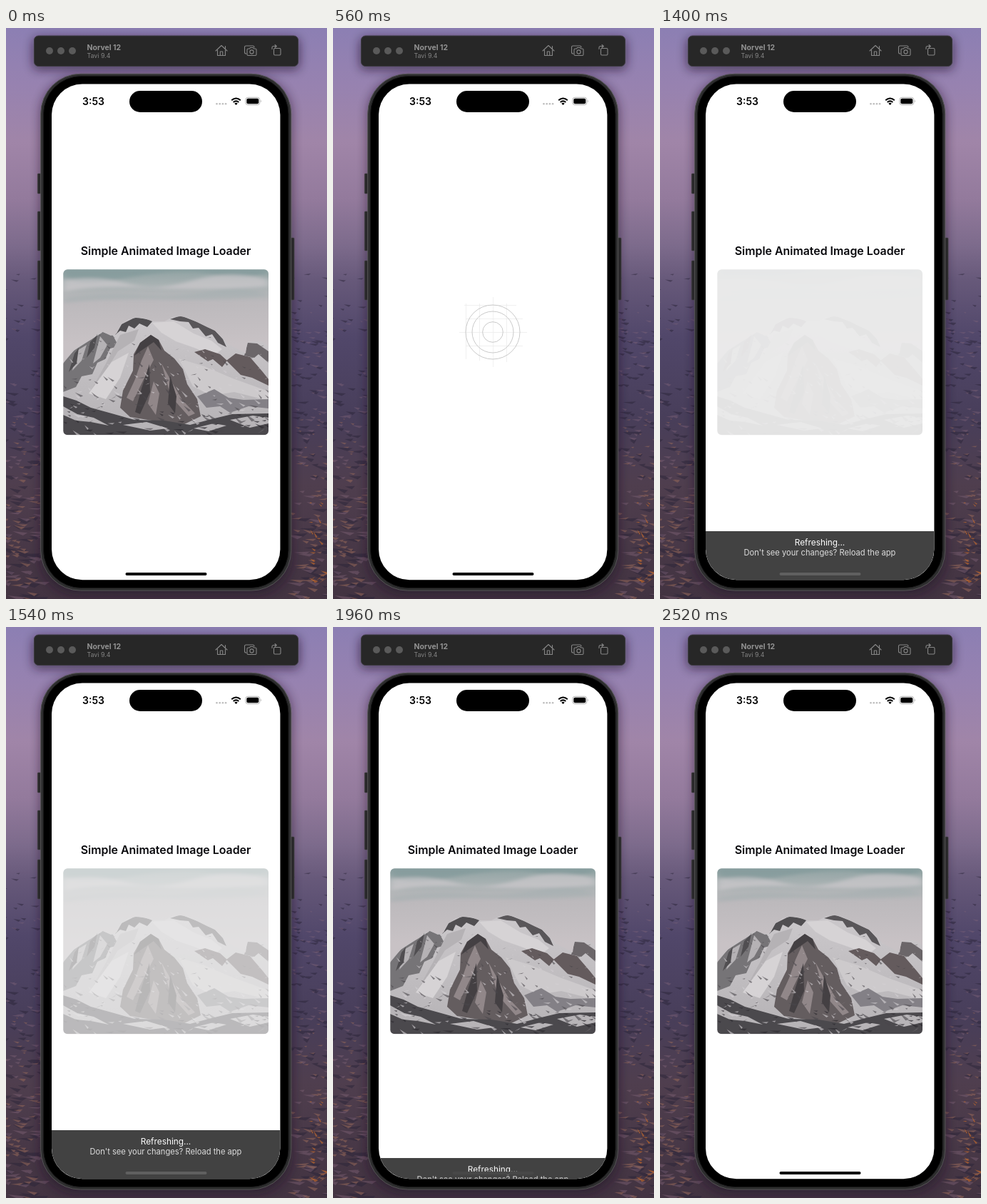
Write an HTML page that moves like this. It is 450 by 800 pixels and loops after 2.59 s.

```html
<!DOCTYPE html>
<html lang="en">
<head>
<meta charset="utf-8">
<title>Image loader</title>
<style>
  html, body { margin: 0; width: 100%; height: 100%; overflow: hidden; background: #4a4060; }
  svg { display: block; width: 450px; height: 800px; font-family: Inter, "Open Sans", sans-serif; }
  .app, .splash, .photo, .panel, .bar, .shine { animation: 2590ms linear infinite; }
  .app { animation-name: app; animation-timing-function: step-end; }
  .splash { animation-name: splash; animation-timing-function: step-end; }
  .photo { animation-name: photo; }
  .panel { animation-name: panel; }
  .bar { animation-name: bar; }
  .shine { animation-name: shine; }
  @keyframes app { 0% { opacity: 1 } 10.811% { opacity: 0 } 27.027%, 100% { opacity: 1 } }
  @keyframes splash { 0% { opacity: 0 } 10.811% { opacity: 1 } 27.027%, 100% { opacity: 0 } }
  @keyframes photo {
    0% { opacity: 1; animation-timing-function: step-end }
    10.811% { opacity: 0; animation-timing-function: step-end }
    50.579% { opacity: 0; animation-timing-function: cubic-bezier(.455, .03, .515, .955) }
    73.745%, 100% { opacity: 1 }
  }
  @keyframes panel {
    0% { transform: translateY(69px); animation-timing-function: step-end }
    27.027% { transform: none }
    70.502% { transform: none; animation-timing-function: ease-in-out }
    80.154%, 100% { transform: translateY(69px) }
  }
  @keyframes bar {
    0% { fill: #000; animation-timing-function: step-end }
    27.027%, 70.502% { fill: #606060 }
    75.7% { fill: #484848 }
    83%, 100% { fill: #000 }
  }
  @keyframes shine {
    0%, 27.027% { transform: translateX(-70px) }
    51.351%, 100% { transform: translateX(330px) }
  }
</style>
</head>
<body>
<svg viewBox="0 0 450 800">
  <defs>
    <linearGradient id="dusk" x2="0" y2="1">
      <stop offset="0" stop-color="#8c7fb3"/>
      <stop offset=".1" stop-color="#9782b0"/>
      <stop offset=".2" stop-color="#a085a8"/>
      <stop offset=".3" stop-color="#937a9c"/>
      <stop offset=".38" stop-color="#7d6b8c"/>
      <stop offset=".44" stop-color="#67597a"/>
      <stop offset=".54" stop-color="#51476a"/>
      <stop offset=".68" stop-color="#483e5a"/>
      <stop offset=".8" stop-color="#4f3e4e"/>
      <stop offset="1" stop-color="#423341"/>
    </linearGradient>
    <linearGradient id="sky" x2="0" y2="1">
      <stop offset="0" stop-color="#8fa2a2"/>
      <stop offset=".09" stop-color="#a8b1b2"/>
      <stop offset=".2" stop-color="#bcb9bc"/>
      <stop offset=".45" stop-color="#c8c2c5"/>
    </linearGradient>
    <linearGradient id="snow" x2="0" y2="1">
      <stop offset="0" stop-color="#cbc8cb"/>
      <stop offset="1" stop-color="#b5b2b5"/>
    </linearGradient>
    <linearGradient id="band">
      <stop offset="0" stop-color="#fff" stop-opacity="0"/>
      <stop offset=".5" stop-color="#fff" stop-opacity=".4"/>
      <stop offset="1" stop-color="#fff" stop-opacity="0"/>
    </linearGradient>
    <filter id="soft" x="-20%" y="-30%" width="140%" height="160%"><feGaussianBlur stdDeviation="7"/></filter>
    <filter id="mist" x="-20%" y="-100%" width="140%" height="300%"><feGaussianBlur stdDeviation="6 2"/></filter>
    <clipPath id="screen"><rect x="64" y="78.600" width="320.400" height="694.600" rx="43"/></clipPath>
    <clipPath id="card"><rect x="80.300" y="338.300" width="287.700" height="232" rx="6"/></clipPath>
    <path id="ridge" d="M80 470 84 463 95 452 105 444 120 436 128 429 136 426 147 431 155 428 162 415 172 408 182 406 195 407 205 411 222 411 234 405 245 404 255 406 268 412 282 419 293 424 303 434 312 443 325 450 336 456 338 441 350 438 360 440 368 446V570H80Z"/>
    <clipPath id="slope"><use href="#ridge"/></clipPath>
  </defs>

  <!-- Desktop -->
  <rect width="450" height="800" fill="url(#dusk)"/>
  <g id="city"></g>

  <!-- Toolbar -->
  <rect x="37" y="13" width="375" height="46" rx="9" fill="#1a1024" opacity=".55" filter="url(#soft)"/>
  <rect x="39.500" y="11" width="370" height="42.500" rx="6" fill="#272727" stroke="#3b3940"/>
  <g fill="#5a5a5a"><circle cx="61" cy="32" r="5"/><circle cx="77" cy="32" r="5"/><circle cx="93" cy="32" r="5"/></g>
  <text x="113.500" y="31" font-size="10.500" font-weight="700" fill="#929292">Norvel 12</text>
  <text x="113.500" y="42" font-size="8.800" fill="#858585">Tavi 9.4</text>
  <g fill="none" stroke="#868686" stroke-width="1.100" stroke-linejoin="round" stroke-linecap="round">
    <path d="M294 32 302 24.500 310 32M296.500 31V38.500H307.500V31M300.300 38V33H303.700V38M307.500 29V25.500"/>
    <path d="M337 36H336.500Q334.500 36 334.500 34V27Q334.500 25 336.500 25H346Q348 25 348 27"/>
    <path d="M339.500 29H341.500L342.500 27.500H346.500L347.500 29H349.500Q351 29 351 30.500V37Q351 38.500 349.500 38.500H339.500Q338 38.500 338 37V30.500Q338 29 339.500 29Z"/>
    <circle cx="344.500" cy="33.500" r="2.600"/>
    <rect x="375.500" y="28.500" width="9.500" height="9.500" rx="1.500"/>
    <path d="M373 29.500V27.500Q373 25.500 375 25.500H379M377 23.500 379.300 25.500 377 27.500"/>
  </g>

  <!-- Phone -->
  <rect x="47" y="67" width="355" height="728" rx="54" fill="#1a1024" opacity=".45" filter="url(#soft)"/>
  <g fill="#29282a" stroke="#454346" stroke-width=".600">
    <rect x="44.300" y="204" width="5" height="28" rx="1"/>
    <rect x="44.300" y="257" width="5" height="55" rx="1"/>
    <rect x="44.300" y="326" width="5" height="55" rx="1"/>
    <rect x="399" y="294" width="5" height="87" rx="1"/>
  </g>
  <rect x="48.700" y="64.200" width="351" height="724" rx="56" fill="#2d2d2e" stroke="#555456"/>
  <rect x="52.500" y="67.500" width="343.500" height="717" rx="53" fill="#000" stroke="#171717"/>

  <g clip-path="url(#screen)">
    <rect x="60" y="75" width="330" height="702" fill="#fff"/>

    <g class="splash" fill="none">
      <path stroke="#ededed" stroke-width=".800" d="M177 426.500H272M224.500 377V475M184 388.500H257M186.500 386V464M186 407.500H266M186 445.500H266M205.500 386V466M243.500 386V468"/>
      <g stroke="#c9c9c9"><circle cx="224" cy="426" r="14.300"/><circle cx="224" cy="426" r="29"/><circle cx="224" cy="426" r="38"/></g>
    </g>

    <g class="app">
      <text x="224" y="318" font-size="15.900" font-weight="600" text-anchor="middle" fill="#08080c">Simple Animated Image Loader</text>
      <g clip-path="url(#card)">
        <rect x="80" y="338" width="289" height="233" fill="#ececec"/>
        <rect class="shine" x="60" y="338" width="80" height="233" fill="url(#band)"/>
        <g class="photo">
          <rect x="80" y="338" width="289" height="233" fill="url(#sky)"/>
          <g filter="url(#mist)">
            <path fill="#7f9798" opacity=".6" d="M80 338H368V342Q330 355 290 345T170 350T80 345Z"/>
            <path fill="#d3ced0" opacity=".6" d="M80 353Q130 346 170 358T260 354T368 352V362Q280 368 200 364T80 370Z"/>
            <path fill="#a3adb0" opacity=".45" d="M80 378Q140 370 190 374T290 368T368 376Q300 382 220 380T80 386Z"/>
          </g>
          <use href="#ridge" fill="url(#snow)"/>
          <g clip-path="url(#slope)">
            <path fill="#767477" d="M80 470 95 452 120 436 136 426 150 431 158 446 146 449 139 464 128 469 121 485 106 488 98 503 80 510Z"/>
            <path fill="#b5b2b5" d="M98 453 113 444 106 466 93 480ZM132 432 142 444 132 462 122 470ZM160 430 186 422 180 438 157 453 137 485 119 508 140 470Z"/>
            <path fill="#504e51" d="M153 430 162 415 182 405 206 410 198 419 187 414 180 421 172 417 168 426 160 424ZM118 440 128 430 124 448 113 462ZM96 456 102 448 99 470 88 482Z"/>
            <path fill="#595659" d="M230 408 245 403 268 412 293 424 304 436 309 447 297 441 289 429 280 432 270 420 262 421 256 412 244 411Z"/>
            <path fill="#d6d3d5" d="M205 413 235 411 263 428 288 438 303 450 291 459 264 448 238 439 218 427ZM148 468 172 455 160 490 140 520 116 512Z"/>
            <path fill="#645d5f" d="M203 430 188 441 179 457 178 480 164 508 160 532 174 545 211 551 246 557 273 544 268 520 254 499 248 478 236 463 222 452 214 437Z"/>
            <path fill="#918789" d="M199 446 190 466 181 492 169 518 178 523 193 492 207 465ZM218 470 233 497 247 521 265 540 256 544 231 516ZM207 495 199 526 210 542 215 512Z"/>
            <path fill="#444043" d="M203 430 188 441 180 459 191 451 207 440 218 452 214 437ZM201 471 190 505 181 538 188 541 202 510ZM230 487 227 526 237 540 239 516Z"/>
            <path fill="#645b5d" d="M264 454 279 450 300 457 310 466 303 475 290 464 283 467ZM309 466 322 456 342 461 360 482 368 492V501L345 490 329 486Z"/>
            <path fill="#6b6669" d="M334 459 339 441 352 442 368 453V469L354 457 348 462Z"/>
            <path fill="#cdcacc" d="M242 463 278 474 318 491 368 509V522L320 510 288 515 262 502Z"/>
            <path fill="#838086" d="M268 516 292 506 312 518 333 521 368 520V533L340 530 314 539 300 530 281 532Z"/>
            <path fill="#4b494d" d="M80 516 99 522 119 532 148 540 180 549 222 550 258 556 288 548 317 541 368 540V570H80Z"/>
            <path fill="#b7b4b7" d="M80 530 100 541 123 546 144 557 119 552 98 550 80 542ZM164 556 197 552 227 561 202 564ZM314 549 346 543 368 546V554L342 560ZM263 561 291 554 309 557 284 565Z"/>
            <g id="rocks"></g>
          </g>
        </g>
      </g>
      <g class="panel">
        <rect x="60" y="705" width="330" height="70" fill="#424242"/>
        <g text-anchor="middle">
          <text x="224" y="725" font-size="11.850" fill="#fff">Refreshing...</text>
          <text x="224" y="739" font-size="11.150" fill="#dedede">Don't see your changes? Reload the app</text>
        </g>
      </g>
    </g>

    <!-- Status bar -->
    <text x="122.500" y="107.500" font-size="14" font-weight="600" text-anchor="middle" fill="#000">3:53</text>
    <rect x="173" y="88" width="102" height="30" rx="15"/>
    <g fill="#bdbdbd"><circle cx="295.500" cy="106.200" r="1.300"/><circle cx="299.700" cy="106.200" r="1.300"/><circle cx="303.900" cy="106.200" r="1.300"/><circle cx="308.100" cy="106.200" r="1.300"/></g>
    <g fill="none" stroke="#000" stroke-width="2">
      <path d="M316.200 101.300Q322.500 95.700 328.800 101.300M318.700 104Q322.500 100.700 326.300 104"/>
      <path fill="#000" stroke="none" d="M320.300 105.700Q322.500 104 324.700 105.700L322.500 108Z"/>
    </g>
    <rect x="335.800" y="97.300" width="20" height="10.400" rx="3.300" fill="none" stroke="#aaa" stroke-width=".900"/>
    <rect x="337.300" y="98.800" width="17" height="7.400" rx="2"/>
    <path d="M357 100.700Q358.800 102.500 357 104.300Z" fill="#aaa"/>
    <rect class="bar" x="167.500" y="763" width="114" height="4" rx="2"/>
  </g>
</svg>
<script>
  let seed = 11;
  const rnd = () => (seed = seed * 16807 % 2147483647) / 2147483647;

  // Scatter n flat slivers over a box, larger towards its bottom.
  function scatter(id, n, [x, y, w, h], size, tilt, fill, opacity) {
    let d = "";
    for (let i = 0; i < n; i++) {
      const k = rnd(), px = x + rnd() * w, py = y + k * h;
      const len = size * (.4 + k) * (.5 + rnd()), rise = len * tilt * (rnd() - .4);
      const thick = size * (.12 + .2 * k);
      d += `M${px.toFixed(1)} ${py.toFixed(1)}l${len.toFixed(1)} ${rise.toFixed(1)} ${(-len * .3).toFixed(1)} ${thick.toFixed(1)}Z`;
    }
    const path = document.createElementNS("http://www.w3.org/2000/svg", "path");
    path.setAttribute("d", d);
    path.setAttribute("fill", fill);
    path.setAttribute("opacity", opacity);
    document.getElementById(id).append(path);
  }

  for (const x of [-12, 392]) {
    scatter("city", 80, [x, 345, 58, 455], 18, .3, "#2b2438", .5);
    scatter("city", 60, [x, 380, 58, 420], 14, .3, "#85687a", .4);
    scatter("city", 50, [x, 540, 58, 260], 12, .4, "#96695a", .55);
  }
  scatter("city", 24, [424, 650, 18, 140], 7, 2.5, "#c0682c", .7);

  scatter("rocks", 110, [80, 425, 288, 140], 8, 1.6, "#4a474b", .6);
  scatter("rocks", 110, [80, 435, 288, 135], 7, 1.6, "#d6d3d5", .6);
  scatter("rocks", 40, [80, 525, 288, 45], 9, .7, "#2f2d32", .7);
</script>
</body>
</html>
```
